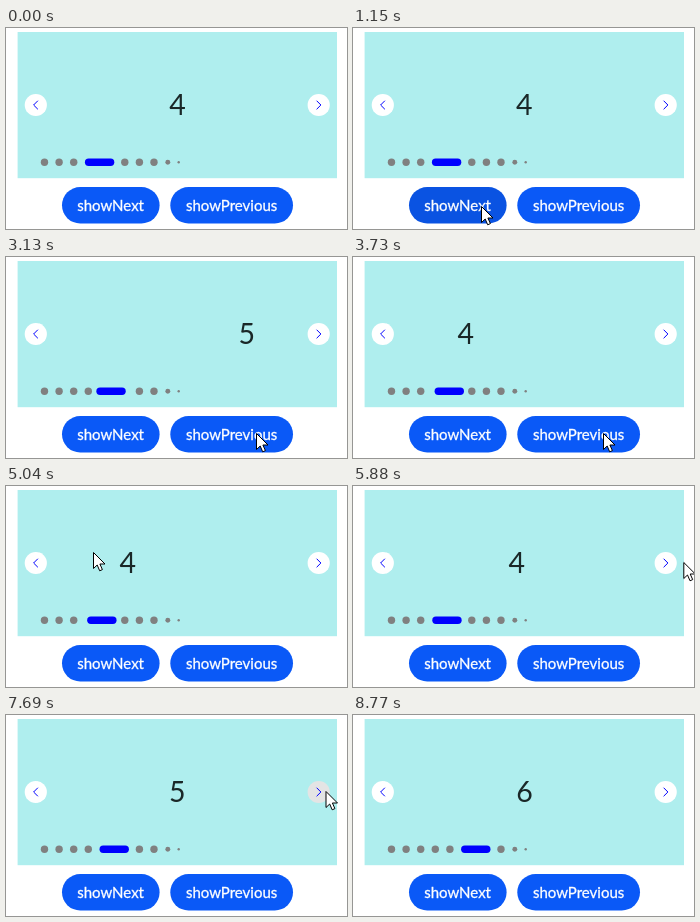
These frames come from a looping animation (341 px wide and 201 px high, 8850 ms). An HTML page:

```html
<!DOCTYPE html>
<html lang="en">
<head>
<meta charset="utf-8">
<title>Swiper</title>
<style>
  html, body { margin: 0; width: 100%; height: 100%; overflow: hidden; background: #fff; }
  svg { display: block; width: 100%; height: 100%; }
  text { font-family: Lato, "Open Sans", sans-serif; text-anchor: middle; }
  .digit { font-size: 28.5px; fill: #1a2727; }
  .button { fill: #0a59f7; }
  .button.pressed { fill: #0a53e2; }
  .label { font-size: 15px; fill: #fff; stroke: #fff; stroke-width: .3; }
  .arrow { fill: #fff; }
  .arrow.pressed { fill: #e4e4e4; }
  .chevron { fill: none; stroke: #00f; stroke-linecap: round; stroke-linejoin: round; }
  .dot { fill: #808080; }
</style>
</head>
<body>
<svg viewBox="0 0 341 201">
  <clipPath id="panelClip"><rect x="11.6" y="4" width="319.4" height="146.2"/></clipPath>
  <rect x="11.6" y="4" width="319.4" height="146.2" fill="#afeeee"/>
  <g id="digits" clip-path="url(#panelClip)"></g>
  <circle class="arrow" cx="29.8" cy="77" r="11.1"/>
  <path class="chevron" d="M31.6 73 l-4 4 l4 4"/>
  <circle class="arrow" id="nextArrow" cx="312.7" cy="77" r="11.1"/>
  <path class="chevron" d="M310.9 73 l4 4 l-4 4"/>
  <g id="dots"></g>
  <rect id="pill" y="130.5" width="29.4" height="7.4" rx="3.7" fill="#00f"/>
  <rect class="button" id="showNext" x="56" y="159" width="97.6" height="36.5" rx="18.25"/>
  <text class="label" x="104.6" y="182.5">showNext</text>
  <rect class="button" id="showPrevious" x="164.3" y="159" width="122.7" height="36.5" rx="18.25"/>
  <text class="label" x="225.6" y="182.5">showPrevious</text>
  <path id="cursor" d="M.5 .5 V16.5 L4.2 13 L6.7 18.8 L9.4 17.6 L6.9 12 H12 Z"
        fill="#fff" stroke="#000" stroke-linejoin="round"/>
</svg>
<script>
const LOOP = 8850;
const FIRST_PAGE = 3, PAGE_WIDTH = 320;
const DOT_START = 38.5, DOT_PITCH = 14.6, DOT_COUNT = 9;
const SWIPE = 1000, PRESS = 100;

// Each slide shifts the page linearly; one with a button also presses it
const slides = [
  { at: 1150, pages: 1, button: "showNext" },
  { at: 2915, pages: -1, button: "showPrevious" },
  { at: 4960, pages: 0.156, duration: 80 }, // drag with the pointer
  { at: 5040, pages: -0.156 },              // falls back
  { at: 6270, pages: 1, button: "nextArrow" },
  { at: 7690, pages: 1, button: "nextArrow" }
];

// Straight pointer moves; y beyond 201 is off stage
const pointerStart = { x: 20, y: 203 };
const pointerMoves = [
  { at: 270, duration: 180, x: 148, y: 181 },
  { at: 700, duration: 200, x: 128, y: 178 },
  { at: 2050, duration: 180, x: 250, y: 176 },
  { at: 4230, duration: 110, x: 222, y: 203 },
  { at: 4400, duration: 230, x: 85, y: 203 },
  { at: 4630, duration: 120, x: 137, y: 60 },
  { at: 4960, duration: 80, x: 87, y: 66 },
  { at: 5200, duration: 600, x: 330.3, y: 76 },
  { at: 5960, duration: 120, x: 319.5, y: 76 },
  { at: 8000, duration: 300, x: -14, y: 203 }
];

const byId = id => document.getElementById(id);
const progress = (time, { at, duration = SWIPE }) => Math.min(1, Math.max(0, (time - at) / duration));
const mix = (a, b, t) => a + (b - a) * t;

function add(parent, tag, attributes) {
  const node = document.createElementNS("http://www.w3.org/2000/svg", tag);
  for (const name in attributes) node.setAttribute(name, attributes[name]);
  return parent.appendChild(node);
}

const digits = [0, 1, 2].map(i => {
  const index = FIRST_PAGE + i;
  const node = add(byId("digits"), "text", { class: "digit", y: 87 });
  node.textContent = index + 1;
  return { index, node };
});

// The last two dots shrink and move closer together
const dots = Array.from({ length: DOT_COUNT }, (_, i) => {
  const shrink = Math.max(0, i - (DOT_COUNT - 3));
  const r = 3.7 - 1.25 * shrink;
  return { r, inset: [0, 0.8, 4.5][shrink], node: add(byId("dots"), "circle", { class: "dot", cy: 134.2, r }) };
});

function drawDots(page) {
  const selected = Math.round(page);
  dots.forEach(({ node, inset }, i) => {
    const slot = i > selected ? i + 1.5 : i; // the pill takes two and a half slots
    node.setAttribute("cx", DOT_START + DOT_PITCH * slot - inset);
    node.style.display = i === selected ? "none" : "";
  });
  byId("pill").setAttribute("x", DOT_START - 3.4 + DOT_PITCH * page);
}

function drawPointer(time) {
  let { x, y } = pointerStart;
  for (const move of pointerMoves) {
    const t = progress(time, move);
    x = mix(x, move.x, t);
    y = mix(y, move.y, t);
  }
  byId("cursor").setAttribute("transform", `translate(${x} ${y})`);
}

function draw(time) {
  const page = slides.reduce((sum, slide) => sum + slide.pages * progress(time, slide), FIRST_PAGE);
  for (const { index, node } of digits) node.setAttribute("x", 171.6 + (index - page) * PAGE_WIDTH);
  drawDots(page);

  for (const id of ["showNext", "showPrevious", "nextArrow"]) {
    const pressed = slides.some(({ button, at }) => button === id && time >= at && time < at + PRESS);
    byId(id).classList.toggle("pressed", pressed);
  }
  drawPointer(time);
}

const start = performance.now();
function tick() {
  draw((performance.now() - start) % LOOP);
  requestAnimationFrame(tick);
}
tick();
</script>
</body>
</html>
```
